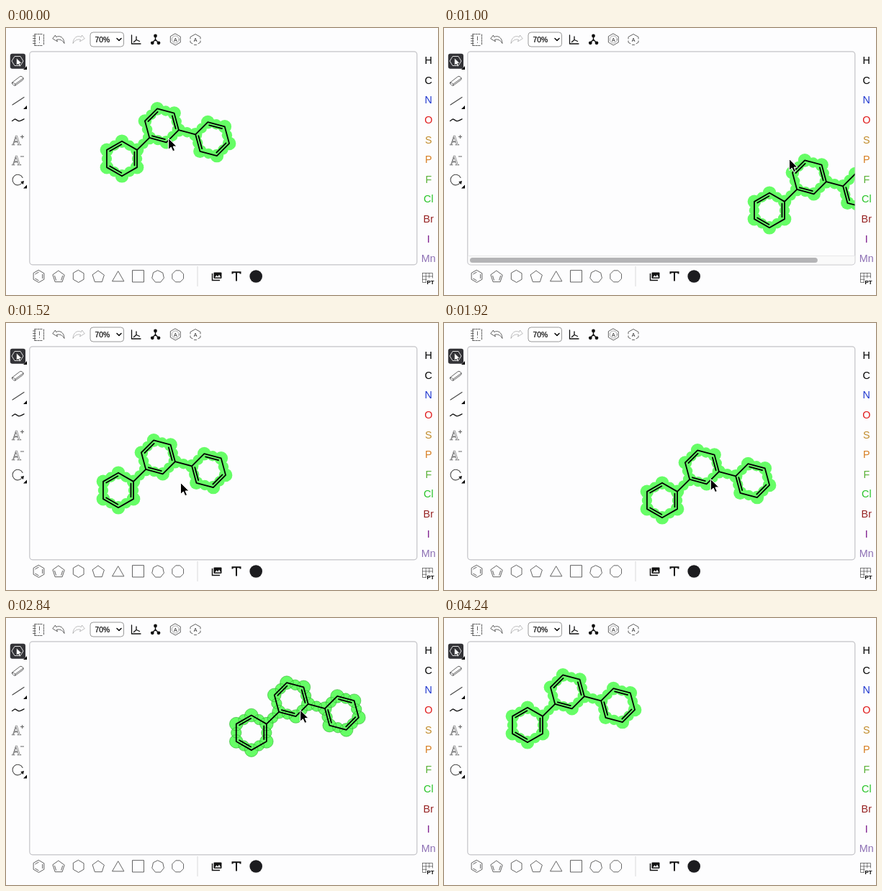
Animation of 600 by 372 pixels, one loop 4280 ms. Source, as an HTML page:

```html
<!DOCTYPE html>
<html lang="en">
<head>
<meta charset="utf-8">
<title>Molecule editor</title>
<style>
html, body { margin: 0; width: 100%; height: 100%; overflow: hidden; background: #fdfdfe; }
svg { display: block; width: 600px; height: 372px; font-family: "Liberation Sans", Arial, sans-serif; }
.thin, .bold { fill: none; stroke: #484848; stroke-linejoin: round; stroke-linecap: round; }
.bold { stroke: #111; }
.bond { fill: none; stroke: #000; stroke-width: 1.8; stroke-linecap: round; stroke-linejoin: round; }
#glow { fill: #66fd66; }
#rim { fill: none; stroke: #1fa51f; stroke-width: .7; stroke-opacity: .75; }
</style>
</head>
<body>
<svg viewBox="0 0 600 372" stroke-width=".85">
  <defs><clipPath id="view"><rect x="33.5" y="33.5" width="537" height="296" rx="4"/></clipPath></defs>

  <g id="top">
    <path class="thin" d="M40 8.500H51M40 24.500H51M52.500 9V24" stroke-dasharray="2.500 1.300"/>
    <path class="thin" d="M40 8.500V24.500M37.500 11H41M37.500 14.500H41M37.500 18H41M37.500 21.500H41M46.500 12V17M46.500 20V20.500"/>
    <path id="undo" class="thin" d="M65 14.500L68.500 10L69.500 12.600C75 9.800 80.500 13 81 21.500C78.500 16.800 74.500 15.300 70.500 16.200L71.300 18.500Z"/>
    <use href="#undo" transform="matrix(-1 0 0 1 174 0)" opacity=".4"/>
    <rect x="117" y="6" width="46.500" height="20" rx="4" fill="#fff" stroke="#888"/>
    <text x="123.500" y="19.700" font-size="10.300" stroke="#000" stroke-width=".2">70%</text>
    <path class="bold" stroke-width="1.600" d="M154 14.500L157 17.500L160 14.500"/>
    <path class="bold" stroke-width="1.300" d="M174.500 10V22H187M181 12V16.500L177.500 19.500M181 16.500L185.500 18.500"/>
    <path class="bold" stroke-width="1.400" d="M207.500 11V16L203 21M207.500 16L212 21"/>
    <g fill="#111"><circle cx="207.500" cy="11" r="2.400"/><circle cx="203.300" cy="20.800" r="2.400"/><circle cx="212" cy="20.800" r="2.400"/></g>
    <g font-size="7" text-anchor="middle" fill="#222"><text x="235.300" y="18.600">A</text><text x="263" y="18.600">A</text></g>
    <circle class="thin" cx="235.300" cy="16" r="5" stroke-opacity=".5"/>
    <path class="thin" d="M256 15V12.500L263 8.500L270 12.500V15M256 18V20L259 21.800M270 18V20L267 21.800M261.500 23.500H264.500"/>
  </g>

  <g id="left">
    <rect x="5.800" y="35.800" width="21.200" height="21" rx="3" fill="#333337"/>
    <path d="M8 46L12 39.500H20L24 46L20 52.500H12Z" fill="none" stroke="#fff"/>
    <path d="M14.500 42V52L17 50L18.800 53.800L20.600 53L18.800 49.200H22Z" fill="#fff" stroke="#222" stroke-width=".5"/>
    <path d="M29 53V58H24ZM29 108V113H24ZM29 218.500V223.500H24Z"/>
    <path class="thin" d="M8.500 76L19.500 67.500Q21 66.800 22.500 68L24 69.800Q24.700 71 23.500 72.300L13 80Q11.700 80.700 10.500 79.500L8.700 78Q8 77 8.500 76M8.600 76.200Q11 75.800 12.700 78.200L13 80M12.700 78.200L24 70"/>
    <path class="thin" d="M9 107L25 96.500" stroke-width="1.200"/>
    <path class="bold" stroke-width="1.300" d="M8.500 129.500L12.500 126.800Q15 128 17 129.500Q19.500 130 21 128.800L25 126.800"/>
    <g fill="#fdfdfe" stroke="#666" stroke-width=".7" font-size="18" font-family="Liberation Serif, serif">
      <text x="8" y="163">A</text>
      <text x="8" y="190.500">A</text>
      <path d="M20 151.500H25M22.500 149V154M20 179H25" stroke-width="1.100"/>
    </g>
    <path class="thin" stroke-width="1.100" d="M22.500 215.500A7.300 7.300 0 1 1 23 208.500"/>
    <path d="M25 213L23.800 218L20.300 214.300Z"/>
  </g>

  <rect x="32.800" y="32.800" width="538" height="297" rx="4" fill="#fdfdfe" stroke="#c4c4c8" stroke-width="1.200"/>
  <g clip-path="url(#view)">
    <g id="mol"><g id="glow"></g><g id="rim"></g><path id="bonds" class="bond"/></g>
    <g id="bar">
      <rect x="33" y="317" width="538" height="13" fill="#fafafa"/>
      <path d="M33 317.500H571" stroke="#e6e6e8"/>
      <rect id="thumb" x="36" y="320" height="7" rx="3.500" fill="#b4b4b6"/>
    </g>
  </g>

  <g id="elements" font-size="14.400" text-anchor="middle"></g>
  <path class="thin" stroke-width=".7" d="M578.500 341.500H592.500V348M578.500 341.500V354.500H583M578.500 346H592.500M578.500 350.300H584M583.200 341.500V354.500M587.800 341.500V348"/>
  <text x="584.500" y="357" font-size="8" font-weight="bold">PT</text>

  <g id="bottom">
    <path d="M266 332V360" stroke="#d2d2d6"/>
    <path d="M286.500 342V351.500H297" fill="none" stroke="#111" stroke-width="1.400"/>
    <rect x="288.500" y="340.500" width="11" height="8.500" rx="1" fill="#111"/>
    <path d="M290 347.500L292.500 344.500L294.300 346.500L296 343.500L298.300 347.500Z" fill="#fdfdfe"/>
    <path d="M314.500 342.500V340.300H325.500V342.500M320 340V352.500" fill="none" stroke="#111" stroke-width="2"/>
    <circle cx="347.200" cy="346" r="8.800" fill="#1c1c1f"/>
  </g>
  <path id="cursor" d="M0 0V16L3.800 12.600L6.300 18.200L9 17L6.600 11.500H11.500Z" stroke="#fff" stroke-width="1" stroke-linejoin="round"/>
</svg>

<script>
const $ = id => document.getElementById(id);
const add = (parent, tag, attrs, text) => {
  const el = document.createElementNS('http://www.w3.org/2000/svg', tag);
  for (const k in attrs) el.setAttribute(k, attrs[k]);
  if (text) el.textContent = text;
  parent.appendChild(el);
};
const ring = (x, y, r, n, turn = 0) => Array.from({ length: n }, (_, i) => {
  const a = (turn - 90 + i * 360 / n) * Math.PI / 180;
  return [x + r * Math.cos(a), y + r * Math.sin(a)];
});
const mix = (p, q, k) => [p[0] + (q[0] - p[0]) * k, p[1] + (q[1] - p[1]) * k];
const poly = pts => 'M' + pts.map(p => p.map(v => v.toFixed(2))).join('L');

// Ring outline with a shorter inner line on every second edge from `first`
function ringPath(pts, c, first, inset, trim) {
  let d = poly(pts) + 'Z';
  for (let i = first; i < pts.length - 1 + first % 2; i += 2) {
    const p = mix(pts[i], c, inset), q = mix(pts[(i + 1) % pts.length], c, inset);
    d += poly([mix(p, q, trim), mix(p, q, 1 - trim)]);
  }
  return d;
}

// Toolbar shapes, evenly spaced and centred by height
const STEP = 27.6;
[6, 5, 6, 5, 3, 4, 7, 8].forEach((n, i) => {
  const r = n === 4 ? 11.3 : n === 3 ? 9.2 : 8.5;
  const x = 45.5 + i * STEP, y = 346 + (n % 2 ? r * (1 - Math.cos(Math.PI / n)) / 2 : 0);
  const pts = ring(x, y, r, n, n % 4 ? 0 : 180 / n);
  add($('bottom'), 'path', { class: 'thin', d: ringPath(pts, [x, y], i < 2 ? 1 : n, .3, .06) });
});
add($('top'), 'path', { class: 'thin', d: poly(ring(235.3, 16, 8, 6)) + 'Z' });

const elements = {
  H: '#000', C: '#000', N: '#2038d0', O: '#e01818', S: '#c08a28', P: '#d67d20',
  F: '#58b034', Cl: '#28c428', Br: '#952020', I: '#7c1a8c', Mn: '#8d70b4'
};
Object.entries(elements).forEach(([s, fill], i) =>
  add($('elements'), 'text', { x: 586.8, y: 50.2 + i * STEP, fill }, s));

// Three linked rings
const [a, b, c] = [[161, 182, 0, 1], [216.4, 135.8, -15, 1], [286.6, 154.6, -15, 0]]
  .map(([x, y, turn, first]) => ({ c: [x, y], first, pts: ring(x, y, 24.3, 6, turn) }));
const links = [[a.pts[1], b.pts[4]], [b.pts[2], c.pts[5]]];
const edges = [a, b, c].flatMap(r => r.pts.map((p, i) => [p, r.pts[(i + 1) % 6]])).concat(links);
$('bonds').setAttribute('d',
  [a, b, c].map(r => ringPath(r.pts, r.c, r.first, .17, .04)).concat(links.map(poly)).join(''));
for (const id of ['glow', 'rim']) {
  const dot = ([cx, cy], r) => add($(id), 'circle', { cx, cy, r });
  edges.forEach(([p, q]) => dot(mix(p, q, .5), 7.2));
  [a, b, c].forEach(r => r.pts.forEach(p => dot(p, 9.3)));
}

// Drag path: time, x, y
const path = [
  [80, 0, 0], [600, 82, 0], [960, 303, 86], [1000, 291, 72], [1040, 254, 29], [1280, 70, -3],
  [1470, -7, 30], [1520, -5, 51], [1560, 17, 69], [1920, 142, 65], [2840, 179.8, -22.2],
  [3040, 198, -34], [3440, 9.5, -27], [3480, -17, -36], [3600, -45, -33]
];

// Monotone cubic through the points of the path
const slope = (i, k) => (path[i + 1][k] - path[i][k]) / (path[i + 1][0] - path[i][0]);
function tangent(i, k) {
  if (i === 0 || i === path.length - 1) return 0;
  const m = slope(i - 1, k), n = slope(i, k);
  return m * n > 0 ? 2 * m * n / (m + n) : 0;
}
function at(time) {
  const t = Math.min(Math.max(time, path[0][0]), path[path.length - 1][0]);
  const i = Math.max(0, path.findIndex(p => p[0] >= t) - 1);
  const p = path[i], q = path[i + 1], h = q[0] - p[0], u = (t - p[0]) / h, v = 1 - u;
  return [1, 2].map(k => p[k] * v * v * (1 + 2 * u) + q[k] * u * u * (3 - 2 * u)
    + h * u * v * (tangent(i, k) * v - tangent(i + 1, k) * u));
}

const LOOP = 4280, TICK = 40, VIEW = 538;
const show = (id, on) => $(id).style.display = on ? '' : 'none';
const move = (id, x, y) => $(id).setAttribute('transform', `translate(${x} ${y})`);
function draw(time) {
  const t = Math.floor(time % LOOP / TICK) * TICK;
  const [x, y] = at(t), [px, py] = at(t + TICK); // the pointer leads the drag
  move('mol', x, y);
  move('cursor', 225.5 + px, 153.5 + py);
  show('cursor', t < 4120);
  show('rim', t >= 2800 && t < 2920);
  const content = 304 + x;
  show('bar', content > VIEW);
  $('thumb').setAttribute('width', 534 * VIEW / Math.max(VIEW, content));
}
const start = performance.now();
function loop() {
  draw(performance.now() - start);
  requestAnimationFrame(loop);
}
loop();
</script>
</body>
</html>
```
